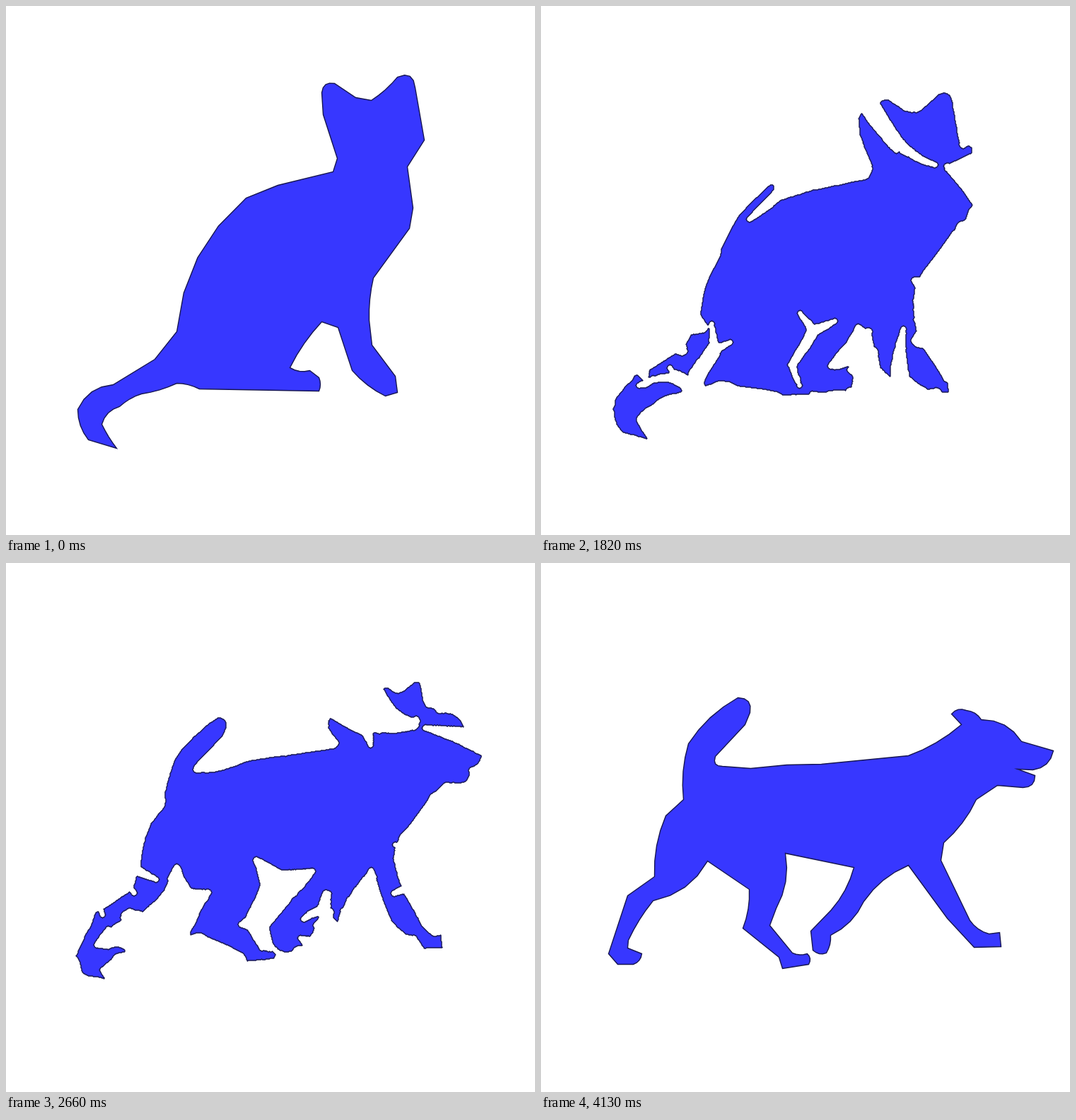
Recreate the animation shown at these times as an HTML page with a canvas. Size 748 by 748 pixels, loop 4.83 s.

```html
<!DOCTYPE html>
<html lang="en">
<head>
<meta charset="utf-8">
<title>Cat to dog morph</title>
<style>
  html, body { margin: 0; width: 100%; height: 100%; overflow: hidden; background: #fff; }
  canvas { display: block; width: 748px; height: 748px; }
</style>
</head>
<body>
<canvas id="stage" width="748" height="748"></canvas>
<script>
const W = 748, LEFT = 84, RIGHT = 734, TOP = 86, BOTTOM = 636;
const HOLD = 700, STEP = 70, STEPS = 50, LOOP = 4830;
const FILL = 0xffff3737, WHITE = 0xffffffff; // ABGR
const CLOSE_RADIUS = 4, ARC_STEPS = 4;

// Key points run clockwise: x, y and how far the line leading there bulges outwards.
const catHead = [[448, 153], [446, 122], [464, 109, 6], [494, 129], [516, 133], [553, 100, -2],
  [578, 115, 10], [591, 189], [567, 227]];
const catFront = [[575, 285], [570, 314], [519, 384], [513, 444, -2], [517, 479], [550, 523],
  [553, 546], [536, 551], [489, 515, 3], [469, 454], [446, 446]];
const catHaunch = [[401, 511, -3], [429, 515, -3], [442, 525], [442, 544, 2], [273, 541], [241, 533, -2]];
const catTail = [[191, 548, 2], [160, 566, -2], [135, 591, -5], [156, 625, -1], [116, 613],
  [101, 570, 4], [151, 535, 9], [210, 499], [241, 460]];
const catBack = [[339, 271, 22], [384, 253], [462, 234], [468, 215]];

const dogTail = [[278, 190, 6], [295, 211, 8], [288, 228], [246, 273], [256, 287, -6]];
const dogBack = [[296, 290], [347, 285], [396, 284], [519, 272], [594, 228, -4]];
const dogHead = [[580, 213], [601, 208, 4], [622, 221, 3], [679, 252, 9], [724, 265], [695, 292, 7],
  [673, 291], [698, 300], [681, 317, 6], [645, 314], [615, 334], [569, 395, 4]];
const dogFront = [[565, 420], [606, 505], [633, 524, -3], [648, 522], [650, 542], [612, 543],
  [574, 502], [519, 427], [456, 478, -6], [409, 526, 6], [403, 551, 2], [384, 547, 3],
  [381, 520], [410, 490], [442, 430, -4]];
const dogHind = [[345, 410], [332, 488, 7], [323, 512], [355, 551], [376, 552, -2], [378, 567, 3],
  [341, 573], [336, 557], [285, 516], [294, 461, -3], [235, 421], [158, 477, 11], [123, 533, -2],
  [122, 544], [142, 552], [130, 567, 3], [108, 567], [95, 552], [122, 470], [160, 443]];
const dogRump = [[176, 357, 5], [201, 334], [208, 255, 4]];

const ctx = document.getElementById('stage').getContext('2d');
const image = ctx.createImageData(W, W);
const pixels = new Uint32Array(image.data.buffer);

const disk = [];
for (let y = -CLOSE_RADIUS; y <= CLOSE_RADIUS; y++)
  for (let x = -CLOSE_RADIUS; x <= CLOSE_RADIUS; x++)
    if (Math.hypot(x, y) <= CLOSE_RADIUS) disk.push(y * W + x);

function eachPixel(visit) {
  for (let y = TOP; y < BOTTOM; y++)
    for (let x = LEFT; x < RIGHT; x++) visit(y * W + x, x, y);
}

// Turns key points into polygon corners, splitting bulged lines into short pieces.
function outline(keys) {
  return keys.flatMap(([x, y, bulge = 0], k) => {
    if (!bulge) return [[x, y]];
    const [px, py] = keys.at(k - 1);
    const dx = x - px, dy = y - py, len = Math.hypot(dx, dy);
    return Array.from({ length: ARC_STEPS }, (_, s) => {
      const t = (s + 1) / ARC_STEPS, h = 4 * t * (1 - t) * bulge / len;
      return [px + t * dx + h * dy, py + t * dy - h * dx];
    });
  });
}

// Stores, for every pixel, whether it is inside and its nearest point of the shape.
function makeShape(...parts) {
  const points = outline(parts.flat());
  const n = points.length;
  const path = new Path2D();
  const px = Float64Array.from(points, p => p[0]), py = Float64Array.from(points, p => p[1]);
  const ex = px.map((v, k) => px[(k + 1) % n] - v), ey = py.map((v, k) => py[(k + 1) % n] - v);
  const len2 = ex.map((v, k) => v * v + ey[k] * ey[k]);
  for (const [x, y] of points) path.lineTo(x + 0.5, y + 0.5);
  path.closePath();

  const inside = new Uint8Array(W * W);
  const nx = new Float32Array(W * W), ny = new Float32Array(W * W);
  eachPixel((i, x, y) => {
    let odd = false, best = Infinity, bx = x, by = y;
    for (let k = 0; k < n; k++) {
      const dx = x - px[k], dy = y - py[k];
      if ((dy < 0) !== (dy < ey[k]) && dx < dy * ex[k] / ey[k]) odd = !odd;
      let t = (dx * ex[k] + dy * ey[k]) / len2[k];
      t = t < 0 ? 0 : t > 1 ? 1 : t;
      const qx = dx - t * ex[k], qy = dy - t * ey[k], d = qx * qx + qy * qy;
      if (d < best) { best = d; bx = x - qx; by = y - qy; }
    }
    inside[i] = odd || best < 0.01 ? 1 : 0;
    nx[i] = inside[i] ? x : bx;
    ny[i] = inside[i] ? y : by;
  });
  return { path, inside, nx, ny };
}

// Is this pixel reached when each point of "from" goes the share k towards its nearest point of "to"?
function reached(i, x, y, from, to, k) {
  const cx = to.nx[i], cy = to.ny[i];
  const ax = Math.round(cx + (x - cx) / (1 - k));
  const ay = Math.round(cy + (y - cy) / (1 - k));
  if (ax < LEFT || ax >= RIGHT || ay < TOP || ay >= BOTTOM) return false;
  const j = ay * W + ax;
  return from.inside[j] && (to.nx[j] - cx) ** 2 + (to.ny[j] - cy) ** 2 < 2.5;
}

function touches(mask, i, value) {
  return mask[i - 1] === value || mask[i + 1] === value ||
         mask[i - W] === value || mask[i + W] === value;
}

// Grows the area holding "value" by the disk.
function grow(mask, value) {
  const out = mask.slice();
  eachPixel(i => {
    if (mask[i] === value && touches(mask, i, 1 - value))
      for (const d of disk) out[i + d] = value;
  });
  return out;
}

// Marching squares: joins the midpoints between pixels that differ.
function contour(mask) {
  const path = new Path2D();
  eachPixel((i, x, y) => {
    const a = mask[i], b = mask[i + 1], c = mask[i + W + 1], d = mask[i + W];
    if (a === b && b === c && c === d) return;
    const ends = [];
    if (a !== b) ends.push([x + 1, y + 0.5]);
    if (b !== c) ends.push([x + 1.5, y + 1]);
    if (c !== d) ends.push([x + 1, y + 1.5]);
    if (d !== a) ends.push([x + 0.5, y + 1]);
    ends.forEach((p, k) => k % 2 ? path.lineTo(...p) : path.moveTo(...p));
  });
  return path;
}

const cat = makeShape(catHead, catFront, catHaunch, catTail, catBack);
const dog = makeShape(dogTail, dogBack, dogHead, dogFront, dogHind, dogRump);

ctx.strokeStyle = '#161652';
ctx.lineWidth = 1.4;
ctx.lineCap = 'round';

function drawWhole(shape) {
  ctx.fillStyle = '#fff';
  ctx.fillRect(0, 0, W, W);
  ctx.fillStyle = '#3737ff';
  ctx.fill(shape.path);
  ctx.stroke(shape.path);
}

function drawBlend(k) {
  const mask = new Uint8Array(W * W);
  eachPixel((i, x, y) => {
    if (reached(i, x, y, cat, dog, k) || reached(i, x, y, dog, cat, 1 - k)) mask[i] = 1;
  });
  const closed = grow(grow(mask, 1), 0); // fills narrow slits
  eachPixel(i => { if (mask[i]) closed[i] = 1; });
  pixels.fill(WHITE);
  eachPixel(i => { if (closed[i]) pixels[i] = FILL; });
  ctx.putImageData(image, 0, 0);
  ctx.stroke(contour(closed));
}

const ease = x => x < 0.5 ? 2 * x * x : 1 - 2 * (1 - x) ** 2;

let shown = -1;
function tick() {
  const t = performance.now() % LOOP;
  const step = t < HOLD ? 0 : Math.min(STEPS, Math.floor((t - HOLD) / STEP) + 1);
  if (step !== shown) {
    shown = step;
    if (step === 0) drawWhole(cat);
    else if (step === STEPS) drawWhole(dog);
    else drawBlend(ease(step / STEPS));
  }
  requestAnimationFrame(tick);
}
tick();
</script>
</body>
</html>
```
